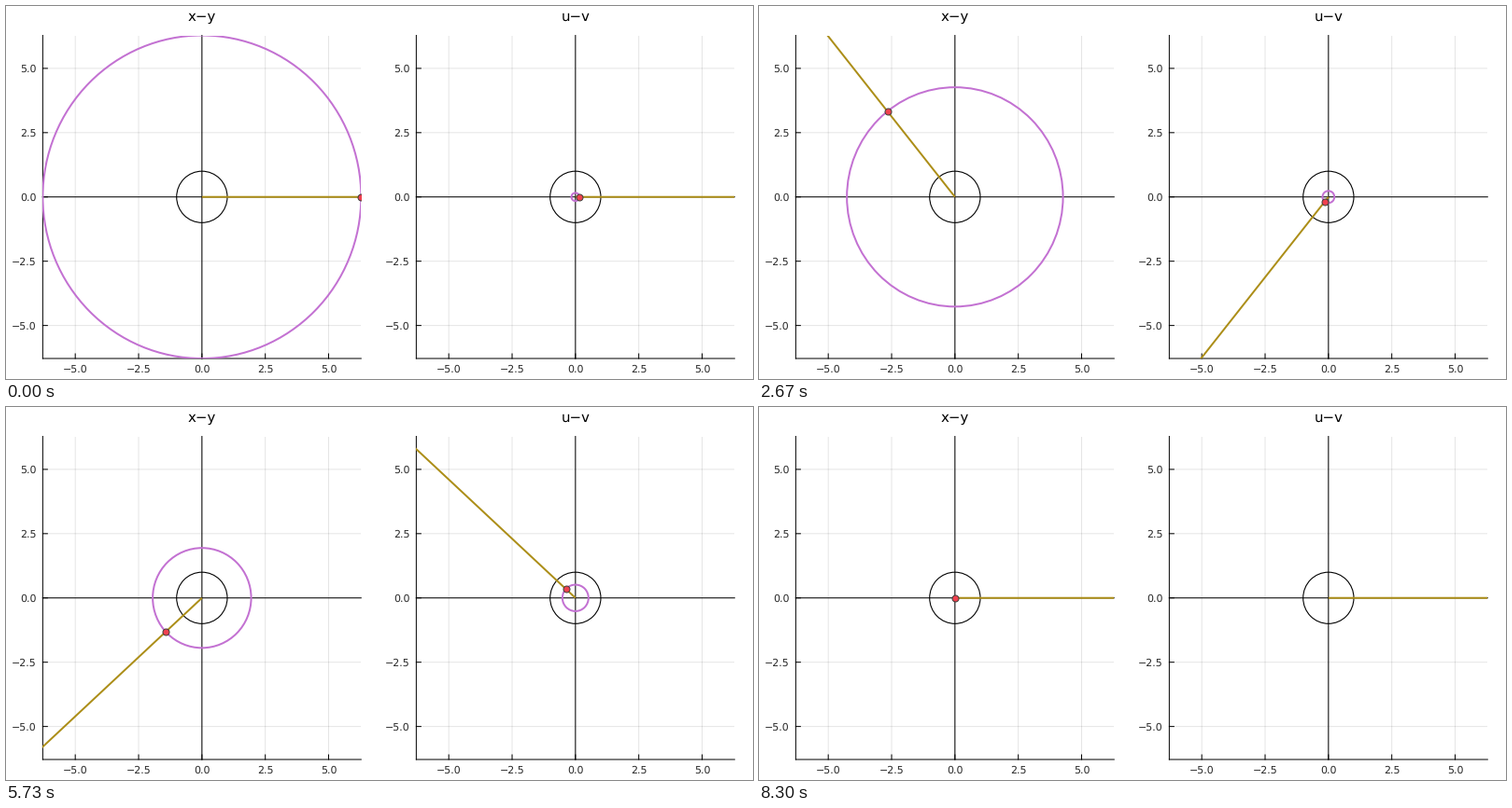
A matplotlib script that plays this animation: 800 by 400 pixels, repeating every 8330 ms.

```python
import numpy as np
import matplotlib.pyplot as plt
from matplotlib.animation import FuncAnimation
from matplotlib.collections import LineCollection
from matplotlib.patches import Circle

W, H, DPI = 800, 400, 100
POSES, TICK_MS, LOOP_MS = 250, 10, 8330
LIM = 2 * np.pi
PX = 72 / DPI  # points per pixel
TOP, BOTTOM, WIDTH = 31.5, 378, 340.95
PURPLE, GOLD, RED = "#c371d2", "#ac8e18", "#f0414f"

plt.rcParams.update({"font.family": "DejaVu Sans", "path.snap": False,
                     "text.hinting": "none", "text.hinting_factor": 1})
fig = plt.figure(figsize=(W / DPI, H / DPI), dpi=DPI, facecolor="white")


def put_text(x, y, text, size, ha="center", color="black"):
    """Text with its baseline at pixel (x, y), measured from the top left."""
    fig.text(x / W, 1 - y / H, text, size=size * PX, ha=ha, va="baseline", color=color)


class Plane:
    """One complex plane with a moving circle, ray and point."""

    def __init__(self, left, title):
        height = BOTTOM - TOP
        ax = fig.add_axes([left / W, 1 - BOTTOM / H, WIDTH / W, height / H])
        ax.set(xlim=(-LIM, LIM), ylim=(-LIM, LIM))
        ax.set_axis_off()
        sx, sy = WIDTH / (2 * LIM), height / (2 * LIM)
        mid_x, mid_y = left + WIDTH / 2, (TOP + BOTTOM) / 2

        grid = []
        frame = [[(-LIM, -LIM), (LIM, -LIM)], [(-LIM, -LIM), (-LIM, LIM)],
                 [(-LIM, 0), (LIM, 0)], [(0, -LIM), (0, LIM)]]
        for t in np.arange(-5, 5.1, 2.5):
            grid += [[(t, -LIM), (t, LIM)], [(-LIM, t), (LIM, t)]]
            frame += [[(t, -LIM), (t, -LIM + 5 / sy)], [(-LIM, t), (-LIM + 5 / sx, t)]]
            label = f"{t:.1f}".replace("-", "\u2212")
            put_text(mid_x + t * sx, 393, label, 10.8, color="#2a2a2a")
            put_text(left - 6.6, mid_y - t * sy + 4, label, 10.8, "right", "#2a2a2a")
        put_text(mid_x, 16, title, 14.9)

        ax.add_collection(LineCollection(grid, colors="black", alpha=0.1,
                                         linewidths=PX, zorder=1), autolim=False)
        ax.add_collection(LineCollection(frame, colors="black", linewidths=PX,
                                         capstyle="projecting", clip_on=False,
                                         zorder=2), autolim=False)
        ax.add_patch(Circle((0, 0), 1, fill=False, ec="black", lw=1.1 * PX, zorder=2))

        self.ring = ax.add_patch(
            Circle((0, 0), 1, fill=False, ec=PURPLE, lw=2 * PX, zorder=3))
        self.ray, = ax.plot([], [], color=GOLD, lw=2 * PX, solid_capstyle="butt", zorder=4)
        self.dot, = ax.plot([], [], "o", ms=7 * PX, mfc=RED, mec="#40403c",
                            mew=PX, zorder=5)

    def place(self, r, angle):
        c, s = np.cos(angle), np.sin(angle)
        finite = np.isfinite(r)
        self.ring.set_visible(finite and r > 0)
        self.dot.set_visible(finite)
        self.ray.set_data([0, 20 * c], [0, 20 * s])
        if finite:
            self.ring.set_radius(r)
            self.dot.set_data([r * c], [r * s])
        return self.ring, self.ray, self.dot


z_plane = Plane(39.37, "x\u2212y")
w_plane = Plane(439.37, "u\u2212v")


def update(tick):
    # 30 poses a second, each starting on the nearest 10 ms tick
    pose = (3 * tick + 1) // 10
    # z spirals inward to the origin while w = 1/z spirals outward
    r = LIM * (1 - pose / (POSES - 1))
    inverse = 1 / r if r > 0 else np.inf
    return z_plane.place(r, 2 * r) + w_plane.place(inverse, -2 * r)


anim = FuncAnimation(fig, update, frames=LOOP_MS // TICK_MS, interval=TICK_MS,
                     repeat=True, repeat_delay=0, blit=False)
plt.show()
```
